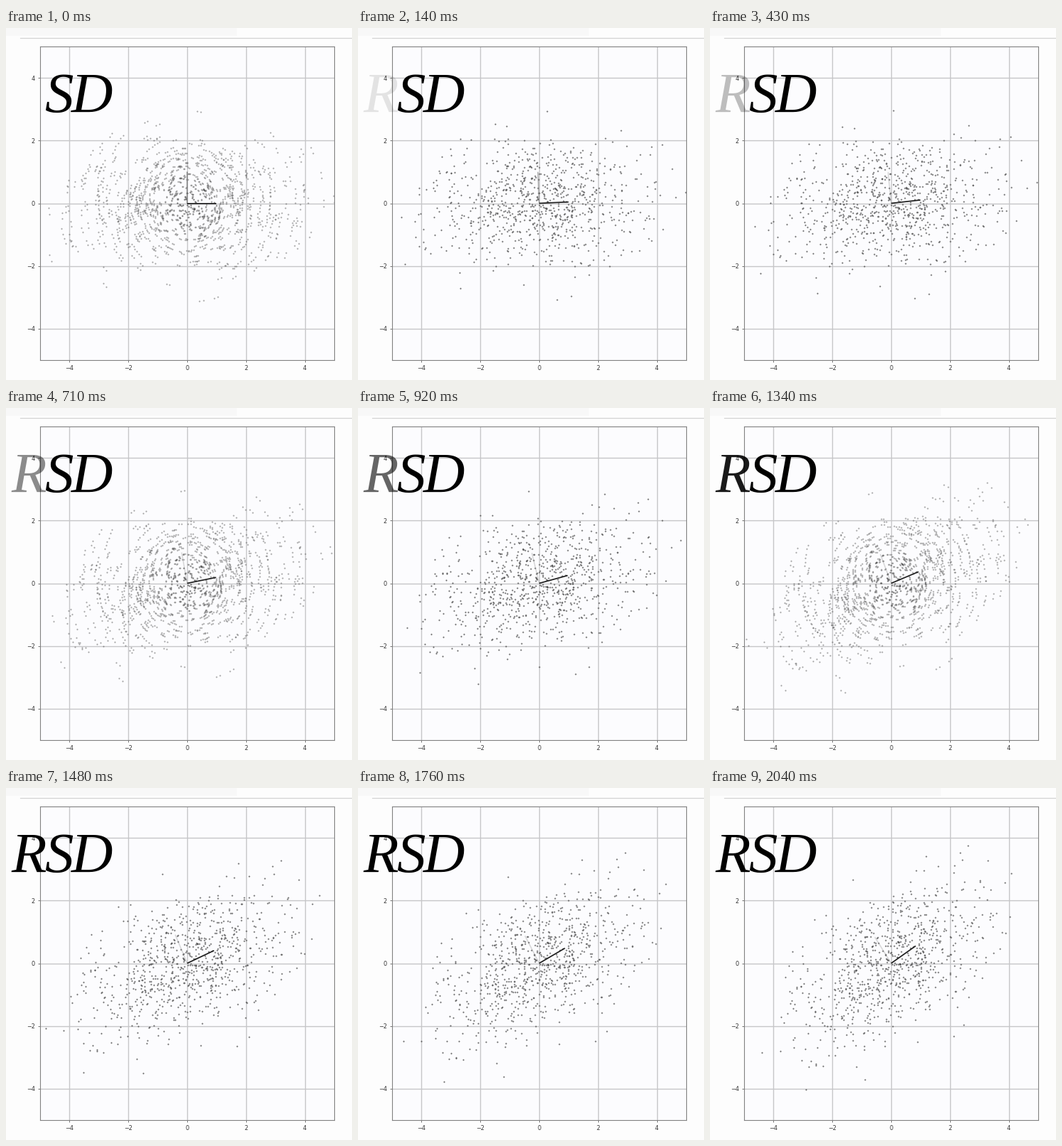
Animation of 487 by 495 pixels, one loop 2110 ms. Source, as a matplotlib script:

```python
import numpy as np
import matplotlib.pyplot as plt
from matplotlib.animation import FuncAnimation
from matplotlib.lines import Line2D
from matplotlib.patches import Rectangle

W, H, DPI = 487, 495, 100
LOOP, TICK = 2110, 10
TURN = np.radians(1.2)
FADE_STEPS = 20
DOT = "#484848"

plt.rcParams["font.family"] = "DejaVu Sans"


def px(n):
    """Pixels to points."""
    return n * 72 / DPI


def rotate(points, angle):
    c, s = np.cos(angle), np.sin(angle)
    return np.array([[c, -s], [s, c]]) @ points


def make_cloud(n=890):
    rng = np.random.default_rng(12)
    body = rng.normal(size=(2, n)) * [[1.85], [0.97]]
    body = body[:, (abs(body[0]) < 4.3) & (abs(body[1]) < 2.12)]
    rim = np.array([
        (.39, 2.93), (-1.4, 2.6), (2.87, 2.2), (.48, -3.1), (.97, -3.0),
        (-2.8, -2.6), (4.55, .9), (4.65, 0), (-4.7, -.25), (-4.65, -1.75),
        (1.1, -2.4), (1.6, -2.35), (-.65, -2.58), (3.9, 1.65), (-1, 2.5),
        (-5.24, .06), (4.99, .14), (-3.94, -1.3), (-2.8, -2.09), (-2.6, 2.17),
    ]).T
    return np.hstack([body, rim])


fig = plt.figure(figsize=(W / DPI, H / DPI), dpi=DPI, facecolor="#fdfdfd")
fig.add_artist(Rectangle((0, 1 - 11 / H), 325 / W, 11 / H, color="#f8f8f8", lw=0))
fig.add_artist(Line2D([20 / W, 1], [1 - 14 / H] * 2, color="#d2d2d2", lw=px(1.2)))

ax = fig.add_axes([48 / W, 1 - 467 / H, 414 / W, 441 / H], facecolor="#fcfcfe")
ax.set(xlim=(-5, 5), ylim=(-5, 5), xticks=range(-4, 5, 2), yticks=range(-4, 5, 2))
ax.set_axisbelow(True)
ax.grid(color="#c6c6c8", lw=px(1.4))
ax.tick_params(length=px(3), width=px(1), pad=px(4), labelsize=px(8.2),
               color="#777777", labelcolor="#333333")
for spine in ax.spines.values():
    spine.set(color="#808080", linewidth=px(1.1))


def letter(char, x):
    return fig.text(x / W, 1 - 119 / H, char, family="Liberation Serif",
                    style="italic", size=px(81), color="black",
                    ha="left", va="baseline")


r_letter = letter("R", 7)
letter("S", 54)
letter("D", 92)

cloud = make_cloud()
dots, echo = (ax.plot([], [], "o", ms=px(2.1), mew=0, color=DOT)[0] for _ in range(2))
y_axis, = ax.plot([], [], color="#777777", lw=px(1.6), solid_capstyle="butt")
x_axis, = ax.plot([], [], color="#1c1c1c", lw=px(1.7), solid_capstyle="butt")


def step_at(ms):
    """Steps last 70 ms, except for one longer hold before 290 ms."""
    return min(ms // 70, 2) if ms < 290 else 3 + (ms - 290) // 70


def update(i):
    step = step_at(i * TICK)
    angle = step * TURN

    # every ninth step blends two neighbouring poses
    blended = step % 9 == 0
    lag = TURN if blended else 0
    dots.set_data(*rotate(cloud, angle + lag))
    dots.set_alpha(0.5 if blended else 0.82)
    echo.set_data(*rotate(cloud, angle - lag))
    echo.set_visible(blended)
    echo.set_alpha(0.5)

    c, s = np.cos(angle), np.sin(angle)
    x_axis.set_data([0, c], [0, s])
    y_axis.set_data([0, -s], [0, c])
    y_axis.set_alpha(max(0.28, 0.85 - 0.12 * step))
    r_letter.set_alpha(min(1, step / FADE_STEPS))
    return dots, echo, x_axis, y_axis, r_letter


anim = FuncAnimation(fig, update, frames=LOOP // TICK, interval=TICK,
                     repeat=True, repeat_delay=0, blit=False)
plt.show()
```
